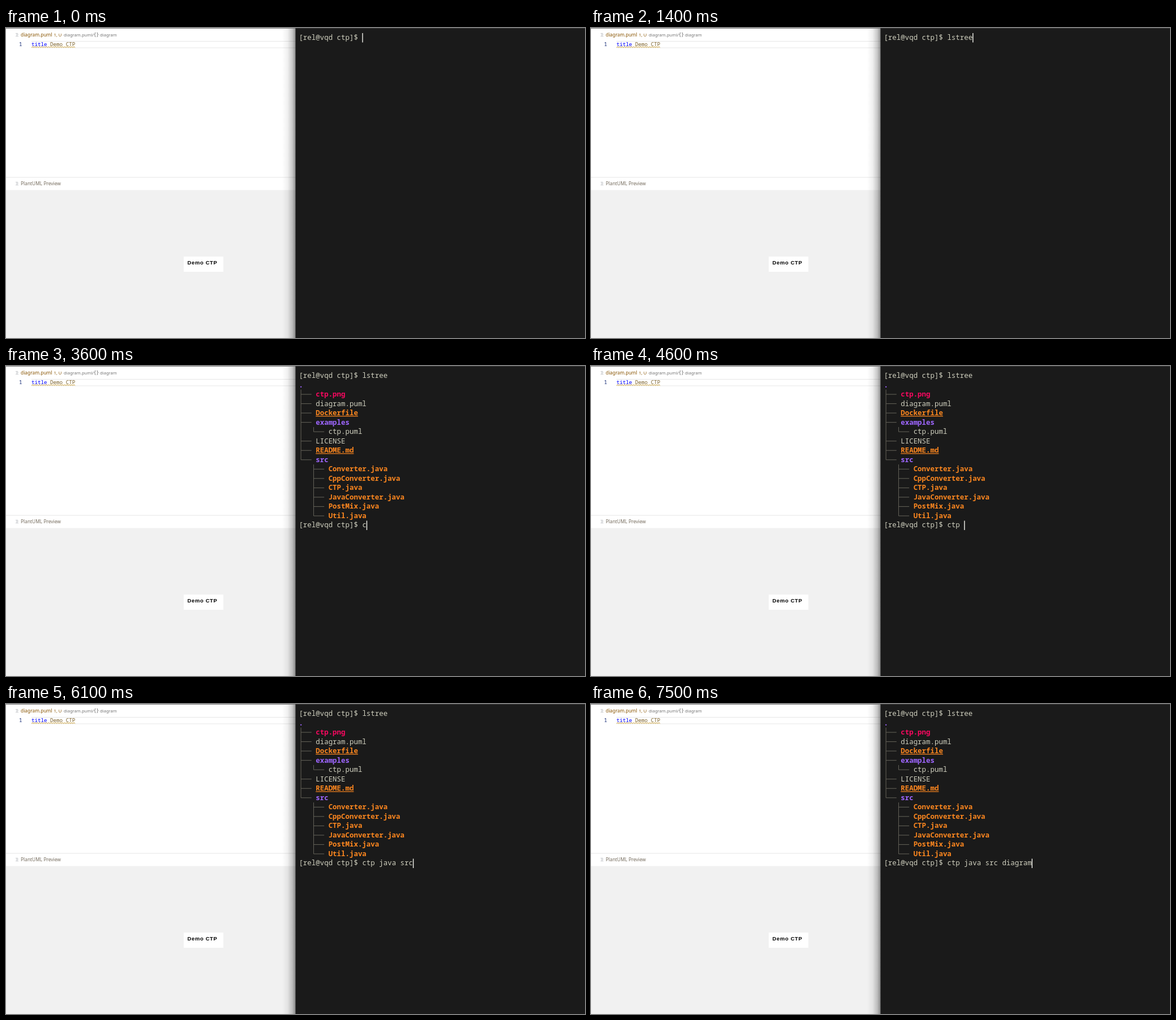
Recreate the animation shown at these times as an HTML page. Size 1023x548 px, loop 8000 ms.

```html
<!DOCTYPE html>
<html lang="en">
<head>
<meta charset="utf-8">
<title>Editor and terminal</title>
<style>
html, body { margin: 0; width: 100%; height: 100%; overflow: hidden; background: #fff; }
svg { display: block; }
text { white-space: pre; }
.ui { font: 8.4px "Noto Sans", sans-serif; }
.small { font-size: 7.6px; }
.code { font: 9.2px "Noto Sans Mono", monospace; }
.term { font: 12.44px "Noto Sans Mono", monospace; fill: #d0d0bf; }
.term .pic { fill: #f6085f; font-weight: 700; }
.term .src { fill: #fd871f; font-weight: 700; }
.term .doc { fill: #fd871f; font-weight: 700; text-decoration: underline; }
.term .dir { fill: #9e66ff; font-weight: 700; }
</style>
</head>
<body>
<svg width="1023" height="548" viewBox="0 0 1023 548">
  <defs>
    <linearGradient id="shade">
      <stop offset="0" stop-opacity="0"/>
      <stop offset=".4" stop-opacity=".06"/>
      <stop offset=".75" stop-opacity=".22"/>
      <stop offset="1" stop-opacity=".45"/>
    </linearGradient>
    <path id="icon" d="M17 9.5h4M18 11.2h4M18 12.9h3M17 14.6h5" stroke="#b9bcc0" stroke-width=".8"/>
  </defs>

  <rect width="512" height="548" fill="#fff"/>
  <path d="M45 23.5H512M45 35H512M0 264H512" stroke="#e6e6e6"/>
  <rect y="286.5" width="512" height="262" fill="#f1f1f1"/>
  <use href="#icon"/>
  <use href="#icon" y="263"/>
  <g class="ui">
    <text x="26" y="15" fill="#895503">diagram.puml</text>
    <g class="small">
      <text x="84.5" y="15" fill="#895503">1, U</text>
      <text x="102" y="14.7" fill="#777">diagram.puml/</text>
      <text x="166" y="14.7" fill="#777">diagram</text>
    </g>
    <text x="155.5" y="14.7" fill="#555" letter-spacing="1.6">{}</text>
    <text x="26" y="278" fill="#746b5c">PlantUML Preview</text>
  </g>
  <g class="code">
    <text x="23" y="32" fill="#0b216f">1</text>
    <text x="45" y="32" fill="#795e26"><tspan fill="#00f">title</tspan> Demo CTP</text>
  </g>
  <path id="squiggle" fill="none" stroke="#bf8803" stroke-width=".8"/>
  <rect x="314" y="404" width="70" height="27" fill="#fff"/>
  <text x="320.5" y="418" font-family="Liberation Sans, Arial, sans-serif" font-size="9.4"
        font-weight="700" letter-spacing=".7">Demo CTP</text>
  <rect x="488" width="24" height="548" fill="url(#shade)"/>
  <path d="M0 .5H512" stroke="#777"/>

  <rect x="511.5" width="511.5" height="548" fill="#1a1a1a"/>
  <path d="M512 .5H1023" stroke="#3a3a3a"/>
  <g class="term">
    <g id="first"></g>
    <g id="output">
      <path id="tree" fill="none" stroke="#66645a"/>
    </g>
    <rect id="cursor" width="1.4" height="16.5" fill="#f4f4ee"/>
  </g>
</svg>
<script>
const LOOP = 8000, CHAR = 7.467, ROW = 16.53, LEFT = 517.4;
const PROMPT = "[rel@vqd ctp]$ ";
const $ = id => document.getElementById(id);
const colX = col => LEFT + col * CHAR;
const midY = row => 17 + row * ROW;

function addText(parent, row, col, string, kind = "") {
  const el = document.createElementNS("http://www.w3.org/2000/svg", "text");
  el.setAttribute("x", colX(col));
  el.setAttribute("y", 21 + row * ROW);
  el.setAttribute("class", kind);
  el.textContent = string;
  return parent.appendChild(el);
}

// Files from row 2 down: name, kind, depth
const files = [
  ["ctp.png", "pic", 0], ["diagram.puml", "", 0], ["Dockerfile", "doc", 0],
  ["examples", "dir", 0], ["ctp.puml", "", 1], ["LICENSE", "", 0],
  ["README.md", "doc", 0], ["src", "dir", 0], ["Converter.java", "src", 1],
  ["CppConverter.java", "src", 1], ["CTP.java", "src", 1],
  ["JavaConverter.java", "src", 1], ["PostMix.java", "src", 1], ["Util.java", "src", 1]
];
const output = $("output");
const trunk = (col, from, to) => `M${colX(col + .5)} ${midY(from - .5)}V${midY(to)}`;
let tree = trunk(0, 2, 9) + trunk(3, 6, 6) + trunk(3, 10, 15);
addText(output, 1, 0, ".", "dir");
files.forEach(([name, kind, depth], i) => {
  const row = i + 2, col = depth * 3;
  tree += `M${colX(col + .5)} ${midY(row)}H${colX(col + 3)}`;
  addText(output, row, col + 4, name, kind);
});
$("tree").setAttribute("d", tree);

let wave = "M45 34.5";
for (let i = 0; i < 38; i++) wave += `l2.03 ${i % 2 ? 1.5 : -1.5}`;
$("squiggle").setAttribute("d", wave);

// Each command: row, text, and [time, letters typed] steps
const commands = [
  { row: 0, text: "lstree", steps: [[300, 1], [700, 2], [900, 3], [1100, 4], [1300, 5], [1400, 6]] },
  { row: 16, text: "ctp java src diagram", steps: [
    [3600, 1], [4200, 2], [4400, 3], [4600, 4], [4800, 5], [5000, 6], [5200, 8], [5500, 9],
    [5700, 10], [5900, 11], [6100, 12], [6400, 13], [6800, 15], [7000, 16], [7200, 18], [7500, 20]] }
];
commands.forEach((cmd, i) => {
  const parent = i ? output : $("first");
  addText(parent, cmd.row, 0, PROMPT);
  cmd.el = addText(parent, cmd.row, PROMPT.length, "");
});

function draw(now) {
  const t = now % LOOP, done = t >= 1900;
  output.style.display = done ? "" : "none";
  for (const cmd of commands) {
    cmd.typed = cmd.steps.reduce((n, [at, count]) => t >= at ? count : n, 0);
    cmd.el.textContent = cmd.text.slice(0, cmd.typed);
  }
  const { row, typed } = commands[+done];
  $("cursor").setAttribute("x", colX(PROMPT.length + typed) - .1);
  $("cursor").setAttribute("y", 9 + row * ROW);
}

const start = performance.now();
function tick() {
  draw(performance.now() - start);
  requestAnimationFrame(tick);
}
tick();
</script>
</body>
</html>
```
